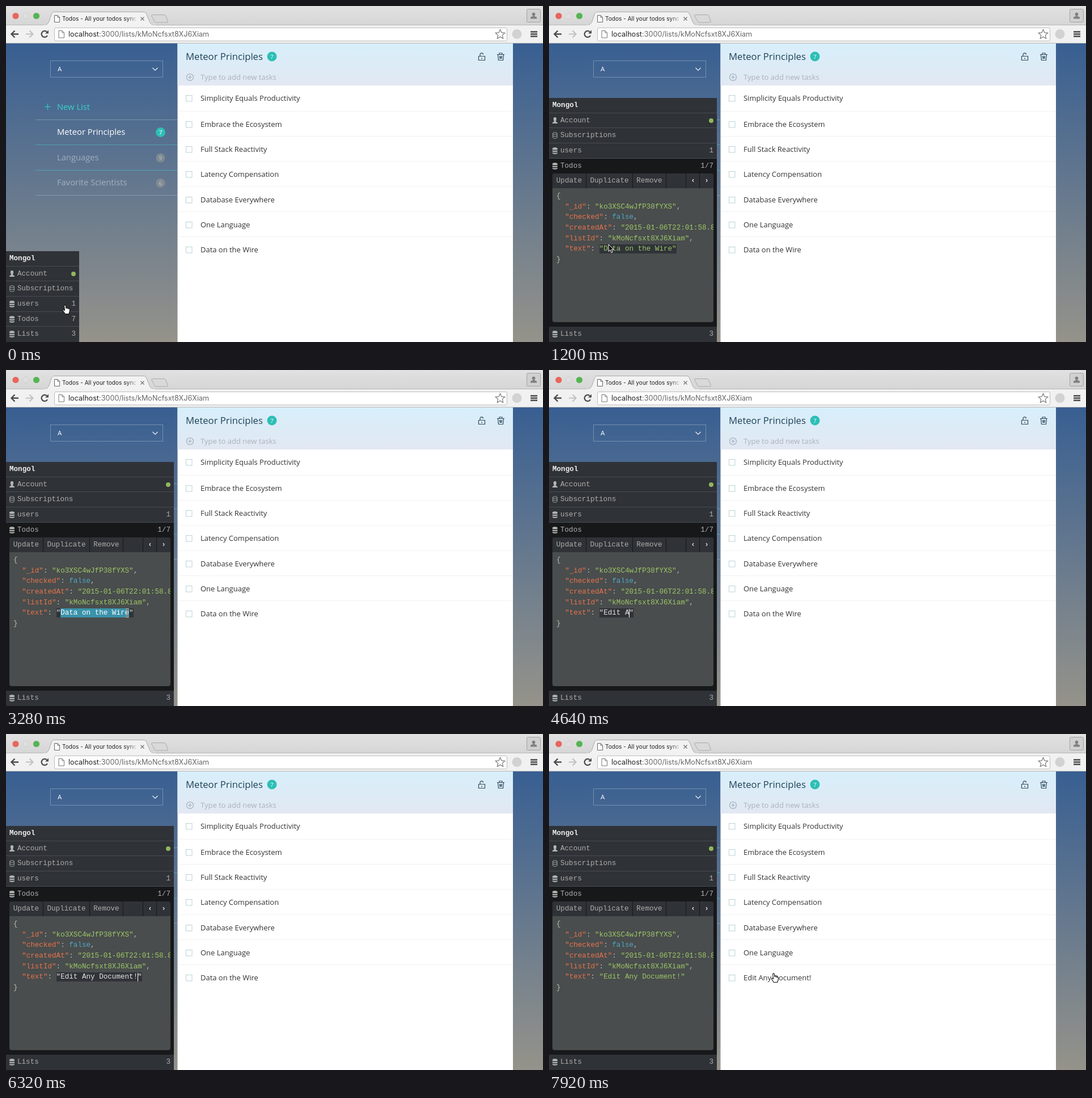
An HTML page that plays this animation: 947 by 592 pixels, repeating every 8 s.

```html
<!DOCTYPE html>
<html lang="en">
<head>
<meta charset="utf-8">
<title>Todos</title>
<style>
html, body { margin: 0; width: 100%; height: 100%; overflow: hidden; }
#stage { position: relative; width: 947px; height: 592px; overflow: hidden; }
#stage > svg { position: absolute; left: 0; top: 0; }
.page { font-family: "Open Sans", sans-serif; font-size: 12.97px; fill: #333; }
.chrome { font-family: Inter, sans-serif; font-size: 12.65px; fill: #222; }
.side { font-size: 14.75px; }
.badge { font-size: 9.5px; text-anchor: middle; }
.badge.big { font-size: 11.5px; }
.line { fill: none; stroke-width: 1.2; }

#panel {
  position: absolute; left: 0; bottom: 0; overflow: hidden; background: #2f3237;
  font: 12.6px "Liberation Mono", monospace; color: #adaeab; white-space: pre;
}
.row { position: relative; box-sizing: border-box; height: 26.67px; line-height: 27.5px; padding-left: 20px; border-bottom: 1px solid #484b50; }
.row:last-child { border-bottom: 0; }
.row b { position: absolute; right: 6px; top: 0; font-weight: 400; }
.row svg { position: absolute; left: 6px; top: 7px; width: 9px; height: 12px; }
.head { padding-left: 6px; font-weight: 700; color: #eee; }
.open { background: #17181a; border-color: #17181a; }
.dot { position: absolute; right: 6px; top: 9px; width: 8px; height: 8px; border-radius: 4px; background: #90b660; }
#body { position: relative; overflow: hidden; background: #17181a; }
#bar { position: absolute; left: 6px; right: 6px; top: 0; height: 25.5px; line-height: 27px; background: #2f3237; border-radius: 3px 3px 0 0; overflow: hidden; }
#bar span { position: absolute; top: 0; height: 26px; box-sizing: border-box; text-align: center; border-right: 1px solid #17181a; }
#bar .nav { width: 25px; border: 0; border-left: 1px solid #17181a; font-weight: 700; color: #ddd; }
#json { position: absolute; left: 6px; right: 6px; top: 26px; height: 236px; box-sizing: border-box; padding: 5px 0 0 7px; line-height: 18.55px; background: #494d4d; color: #b9bcb8; border-radius: 0 0 4px 4px; overflow: hidden; }
#json i { font-style: normal; color: #e8734c; }
#json em { font-style: normal; color: #9cc666; }
#json u { text-decoration: none; color: #50a6c6; }
#field { position: relative; color: #9cc666; }
#field.hover { background: #303338; }
#field.edit { background: #303338; color: #e4e4e4; }
#field, #sel { padding: 1px 0; }
#sel { color: #fff; background: #3a93ab; }
#caret { position: absolute; top: 1px; width: 1px; height: 15px; background: #fff; }
</style>
</head>
<body>
<div id="stage">
<svg width="947" height="592" viewBox="0 0 947 592">
  <defs>
    <linearGradient id="sky" x2="0" y2="1"><stop stop-color="#385f92"/><stop offset="1" stop-color="#95938a"/></linearGradient>
    <linearGradient id="hdr" x2="0" y2="1"><stop stop-color="#d7effb"/><stop offset="1" stop-color="#e2e8f2"/></linearGradient>
    <linearGradient id="tabs" x2="0" y2="1"><stop stop-color="#e1e1e1"/><stop offset="1" stop-color="#d6d6d6"/></linearGradient>
    <linearGradient id="fade"><stop offset=".3" stop-color="#f2f2f2" stop-opacity="0"/><stop offset="1" stop-color="#f2f2f2"/></linearGradient>
    <symbol id="db" viewBox="0 0 9 12"><path d="M0 2.2C0-.3 9-.3 9 2.2v1.3C9 5 0 5 0 3.500zM0 5c1 1.400 8 1.400 9 0v2.200C8 8.600 1 8.600 0 7.200zM0 8.700c1 1.400 8 1.400 9 0v1.300c0 2.500-9 2.500-9 0z" fill="#b4b5b2"/></symbol>
    <symbol id="subs" viewBox="0 0 9 12"><path d="M.7 2.500c0-2.300 7.600-2.300 7.600 0s-7.600 2.300-7.600 0v7c0 2.300 7.600 2.300 7.600 0v-7M.7 6c0 2.300 7.600 2.300 7.600 0" fill="none" stroke="#a5a6a3"/></symbol>
    <symbol id="user" viewBox="0 0 9 12"><path d="M4.500 0C7 0 7.500 2 7 4.500 6.800 6 6 6.500 6 7.500L9 9.500V11H0V9.500l3-2c0-1-.8-1.500-1-3C1.500 2 2 0 4.500 0z" fill="#b4b5b2"/></symbol>
  </defs>

  <rect y="66" width="947" height="526" fill="url(#sky)"/>

  <!-- browser frame -->
  <g class="chrome">
    <rect width="947" height="33" fill="url(#tabs)"/>
    <rect y="33" width="947" height="33" fill="#f1f1f1"/>
    <path d="M0 33.500H69M260 33.500H947M0 65.500H947" stroke="#b6b6b6"/>
    <path d="M67 34C73 33 74 31 76 27L80 15C82 11 83 10.500 86 10.500H242C246 10.500 247 12 248 15L253 27C255 32 257 33 262 34" fill="#f2f2f2" stroke="#a9a9a9"/>
    <rect x="66" y="33.500" width="198" height="3" fill="#f1f1f1"/>
    <path d="M258 15.500H279Q281 15.500 282 18L285 26Q286 29 284 29H265Q263 29 262 27L257 18Q256 15.500 258 15.500z" fill="#d9d9d9" stroke="#ababab"/>
    <circle cx="17" cy="17.500" r="5.600" fill="#e8665c"/>
    <circle cx="35" cy="17.500" r="5.300" fill="#dedede" stroke="#c6c6c6" stroke-width=".6"/>
    <circle cx="53.500" cy="17.500" r="5.600" fill="#55b553"/>
    <path d="M85.500 16.500H91L94.500 20V28.500H85.500zM91 16.500V20H94.500" fill="#fff" stroke="#666"/>
    <text x="99" y="26" font-size="10.1">Todos - All your todos sync</text>
    <rect x="205" y="14" width="28" height="16" fill="url(#fade)"/>
    <path d="M237.500 19.500l6 6m0-6l-6 6" stroke="#777" stroke-width="1.300"/>
    <rect x="918.500" y="5.500" width="24" height="23" rx="2" fill="#d0d0d0" stroke="#a2a2a2"/>
    <path d="M930.500 11.500a3 3 0 0 1 1.500 5.600v1l4 1.500v3h-11v-3l4-1.500v-1a3 3 0 0 1 1.500-5.600z" fill="#808080"/>
    <path d="M22 49.500H10M15.500 43.500l-6 6 6 6" class="line" stroke="#4b4b4b" style="stroke-width:2.400"/>
    <path d="M35 49.500H47M41.500 43.500l6 6-6 6" class="line" stroke="#c2c2c2" style="stroke-width:2.200"/>
    <path d="M73 52a5.500 5.500 0 1 1-1-6.500" class="line" stroke="#4b4b4b" style="stroke-width:2.200"/>
    <path d="M75 42.500V48.500H69z" fill="#4b4b4b"/>
    <rect x="85.500" y="38.500" width="798" height="23" rx="2.500" fill="#fff" stroke="#bcbcbc"/>
    <path d="M93 43.500H99L102.500 47V56H93zM99 43.500V47H102.500" fill="#fff" stroke="#777"/>
    <text x="110" y="54">localhost<tspan fill="#666">:3000/lists/kMoNcfsxt8XJ6Xiam</tspan></text>
    <path d="M871.500 41.500l2.400 5.400 5.800.600-4.300 3.900 1.200 5.800-5.100-3-5.100 3 1.200-5.800-4.300-3.900 5.800-.600z" class="line" stroke="#777"/>
    <circle cx="901" cy="49.500" r="8.500" fill="#d2d2d2"/>
    <path d="M925 45.500H937M925 49.500H937M925 53.500H937" stroke="#484848" stroke-width="2.400"/>
  </g>

  <!-- sidebar -->
  <g class="page side">
    <rect x="78.500" y="96.500" width="198" height="29" fill="none" stroke="#a9bccb" stroke-opacity=".5"/>
    <text x="91" y="115" font-size="11.500" fill="#fff">A</text>
    <path d="M258.500 109l4.500 4.500 4.500-4.500" class="line" stroke="#eef3f6"/>
    <path d="M68 177.500H79M73.500 172V183" class="line" stroke="#2cd0c3"/>
    <text x="90" y="183" fill="#36d3c5">New List</text>
    <text x="90" y="227" fill="#fff">Meteor Principles</text>
    <text x="90" y="272" fill="#fff" fill-opacity=".42">Languages</text>
    <text x="90" y="316" fill="#fff" fill-opacity=".42">Favorite Scientists</text>
    <path d="M52 200.500H302M52 333.500H302" stroke="#8eb4bd" stroke-opacity=".6"/>
    <path d="M52 244.500H302M52 289.500H302" stroke="#4fb6bb" stroke-opacity=".7"/>
    <circle cx="272.500" cy="222.500" r="8.500" fill="#2cbfb6"/>
    <g fill="#a0a098" fill-opacity=".5"><circle cx="272.500" cy="267.500" r="8"/><circle cx="272.500" cy="312" r="8"/></g>
    <g fill="#fff">
      <text class="badge big" x="272.500" y="227">7</text>
      <text class="badge" x="272.500" y="271" fill-opacity=".55">9</text>
      <text class="badge" x="272.500" y="315.500" fill-opacity=".55">6</text>
    </g>
  </g>

  <!-- task list -->
  <g class="page">
    <rect x="302.500" y="66" width="591.500" height="526" fill="#fff"/>
    <rect x="302.500" y="66" width="591.500" height="74" fill="url(#hdr)"/>
    <text x="317" y="95.200" style="font-size:16.670px" fill="#1f4258">Meteor Principles</text>
    <circle cx="469" cy="89" r="8.500" fill="#2cbfb6"/>
    <text class="badge" x="469" y="92.500" fill="#fff">7</text>
    <g class="line" stroke="#2d4a5c">
      <path d="M833.500 88.500H844.500V95.500H833.500zM836 88.500V85.500a2.700 2.700 0 0 1 5.400 0M839 91V93.500"/>
      <path d="M866 85.500H879M870 85V83H875V85M867.500 85.500L868.500 95.500H876.500L877.500 85.500M870.500 88L871 93M872.500 88V93M874.500 88L874 93"/>
    </g>
    <path d="M330.500 125.500a6 6 0 1 1-12 0a6 6 0 1 1 12 0M321 125.500H328M324.500 122V129" class="line" stroke="#9fb0bc"/>
    <text x="343" y="130.300" fill="#aab3bb">Type to add new tasks</text>
    <g id="tasks"></g>
  </g>
</svg>

<div id="panel"><div class="row head">Mongol</div><div class="row"><svg><use href="#user"/></svg>Account<span class="dot"></span></div><div class="row"><svg><use href="#subs"/></svg>Subscriptions</div><div class="row"><svg><use href="#db"/></svg>users<b>1</b></div><div class="row" id="todos"><svg><use href="#db"/></svg>Todos<b id="count">7</b></div><div id="body"><div id="bar"><span style="left:0;width:60px">Update</span><span style="left:60px;width:82px">Duplicate</span><span style="left:142px;width:59px">Remove</span><span class="nav" id="prev" style="right:24px">‹</span><span class="nav" style="right:0">›</span></div><div id="json">{
  <i>"_id"</i>: <em>"ko3XSC4wJfP38fYXS"</em>,
  <i>"checked"</i>: <u>false</u>,
  <i>"createdAt"</i>: <em>"2015-01-06T22:01:58.820Z"</em>
  <i>"listId"</i>: <em>"kMoNcfsxt8XJ6Xiam"</em>,
  <i>"text"</i>: <span id="field">"<span id="sel"></span><span id="rest"></span><span id="caret"></span>"</span>
}</div></div><div class="row"><svg><use href="#db"/></svg>Lists<b>3</b></div></div>

<svg width="947" height="592" viewBox="0 0 947 592">
  <g id="cursor">
    <path id="arrow" d="M0 0V12.500L3 9.800 5 14.700 7.200 13.700 5.200 9H9z" fill="#111" stroke="#fff"/>
    <path id="hand" d="M-1.300 1.300C-1.300-.6 1.300-.6 1.400 1.300L2 5.500C3 4.600 4.300 5 4.500 6 5.600 5.200 6.700 5.800 6.800 6.800 8 6.300 8.700 7.200 8.600 8.200L8 12 6.800 15.500H.3L-3.500 9.800C-4.300 8.300-2.600 7.500-1.500 8.600L-.5 9.500z" fill="#fff" stroke="#111" stroke-width="1.100"/>
    <g id="beam" fill="none"><path d="M-3-7Q0-7 0-5Q0-7 3-7M0-5V5M-3 7Q0 7 0 5Q0 7 3 7" stroke="#fff" stroke-width="2.200"/><path d="M-3-7Q0-7 0-5Q0-7 3-7M0-5V5M-3 7Q0 7 0 5Q0 7 3 7" stroke="#222"/></g>
  </g>
</svg>
</div>

<script>
const LOOP = 8000, STEP = 80, CHAR = 7.56;
const BEFORE = 'Data on the Wire', AFTER = 'Edit Any Document!';
const OPEN = 360, OPEN_TIME = 500, FOCUS = 1520, DRAG = 2240;
const TYPE = 4000, KEY = 115, SAVE = 7200, SAVED = 7280;
const TYPED = TYPE + KEY * (AFTER.length - 1);
const FIELD_X = 96;

// time, x, y of the pointer tip
const PATH = [
  [0, 104, 527], [280, 94, 546], [560, 84.5, 546], [720, 85, 545], [1200, 105, 420],
  [1440, 112, 427], [1840, 110, 428], [2200, 97, 428], [2400, 97, 428], [3200, 214, 428],
  [3840, 214, 428], [6500, 214, 428], [7040, 36, 306], [7280, 36, 306], [7840, 396, 422], [8000, 396, 422]
];

const $ = id => document.getElementById(id);
const clamp = (v, lo = 0, hi = 1) => Math.min(hi, Math.max(lo, v));
const show = (id, on) => { $(id).style.display = on ? '' : 'none'; };
const setText = (id, s) => { if ($(id).textContent !== s) $(id).textContent = s; };

// task name, text baseline
const TASKS = [
  ['Simplicity Equals Productivity', 167], ['Embrace the Ecosystem', 213],
  ['Full Stack Reactivity', 257], ['Latency Compensation', 301],
  ['Database Everywhere', 346], ['One Language', 390], [BEFORE, 434]
];
$('tasks').innerHTML = TASKS.map(([name, y], i) => {
  const rule = i ? `<path d="M303 ${y - 27.5}H894" stroke="#f1f2f3"/>` : '';
  return `${rule}<rect x="317.5" y="${y - 9.5}" width="10.500" height="10.500" fill="#fff" stroke="#bcd3d9"/>
    <text x="343" y="${y}">${name}</text>`;
}).join('');
$('tasks').lastElementChild.id = 'last';

// the CSS "ease" curve
function ease(x) {
  let lo = 0, hi = 1, s = x;
  for (let i = 0; i < 24; i++) {
    s = (lo + hi) / 2;
    const bx = .75 * s * (1 - s) + s ** 3;
    if (bx < x) lo = s; else hi = s;
  }
  return .3 * s * (1 - s) ** 2 + 3 * s * s * (1 - s) + s ** 3;
}

function pointer(t) {
  const i = Math.max(1, PATH.findIndex(p => p[0] > t));
  const [t0, x0, y0] = PATH[i - 1], [t1, x1, y1] = PATH[i];
  const u = (t - t0) / (t1 - t0), k = u * u * (3 - 2 * u);
  return [x0 + (x1 - x0) * k, y0 + (y1 - y0) * k];
}

function drawPanel(t) {
  const p = ease(clamp((t - OPEN) / OPEN_TIME)), w = 129 + 167 * p, opened = t >= OPEN;
  $('panel').style.width = w + 'px';
  $('body').style.height = 270 * p + 'px';
  $('todos').className = opened ? 'row open' : 'row';
  setText('count', opened ? '1/7' : '7');
  show('prev', w >= 262);
}

function drawField(t, x) {
  const editing = t >= FOCUS && t < SAVE;
  const typed = t >= TYPE ? clamp(Math.floor((t - TYPE) / KEY) + 1, 0, AFTER.length) : 0;
  const value = typed ? AFTER.slice(0, typed) : BEFORE;
  let n = 0;
  if (t >= DRAG && !typed) n = t >= 3200 ? BEFORE.length : clamp(Math.round((x - FIELD_X) / CHAR), 0, BEFORE.length);
  setText('sel', value.slice(0, n));
  setText('rest', value.slice(n));
  $('field').className = editing ? 'edit' : t >= 1120 && t < FOCUS ? 'hover' : '';
  const since = t < TYPE ? t - FOCUS : Math.max(0, t - TYPED);
  show('caret', editing && !n && since % 1000 < 530);
  const at = typed || 2;
  $('caret').style.left = (at + 1) * CHAR - .5 + 'px';
  setText('last', t >= SAVED ? AFTER : BEFORE);
}

function drawCursor(t, x, y) {
  const hand = t < 440 || t >= 6960 && t < 7360 || t >= 7760;
  const beam = t >= 1360 && t < 6640;
  $('cursor').setAttribute('transform', `translate(${x} ${y})`);
  show('cursor', t < 3840 || t >= 6500);
  show('hand', hand);
  show('beam', beam);
  show('arrow', !hand && !beam);
}

function frame(now) {
  const t = Math.floor(now % LOOP / STEP) * STEP;
  const [x, y] = pointer(t);
  drawPanel(t);
  drawField(t, x);
  drawCursor(t, x, y);
  requestAnimationFrame(frame);
}
frame(performance.now());
</script>
</body>
</html>
```
